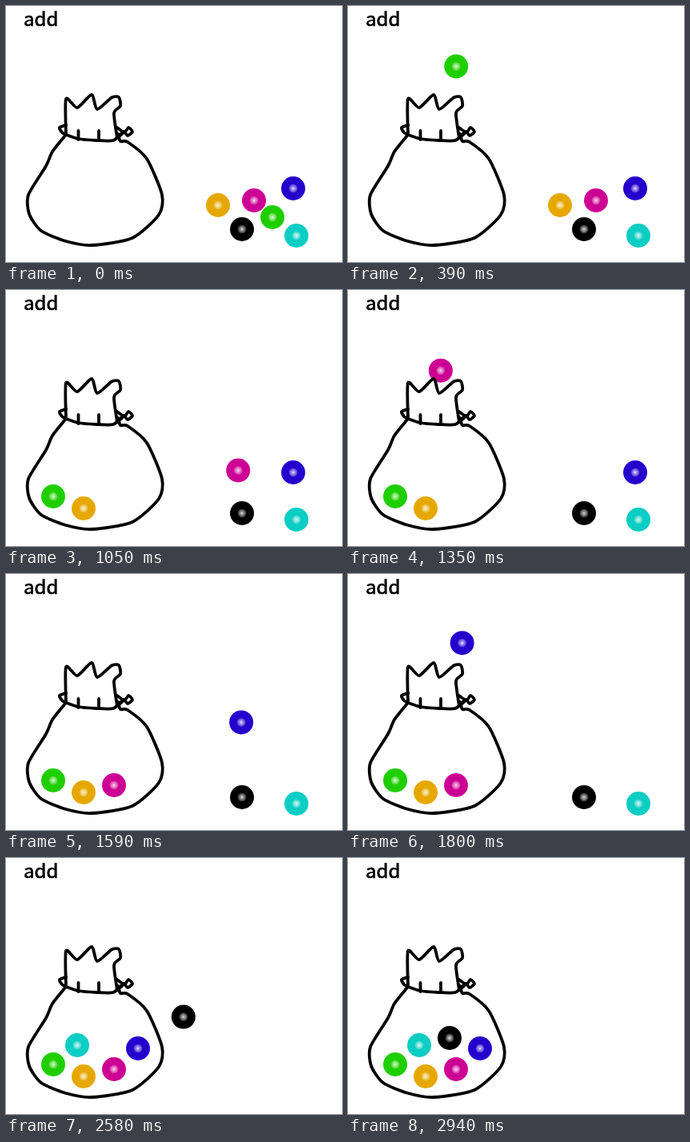
Write an HTML page with a canvas that moves like this. It is 420 by 320 pixels and loops after 3670 ms.

```html
<!DOCTYPE html>
<html lang="en">
<head>
<meta charset="utf-8">
<title>Add to the bag</title>
<style>
html, body { margin: 0; width: 100%; height: 100%; overflow: hidden; background: #fff; }
canvas { display: block; }
</style>
</head>
<body>
<canvas id="stage" width="420" height="320"></canvas>
<script>
const ctx = document.getElementById('stage').getContext('2d');
const LOOP = 3670, STEP = 30, LAST = 98;
const RADIUS = 15, SHINE = 5.5, FALL = 6;

// A ball leaves its rest place at step `go`, is above the bag at step `top`,
// and drops into its slot FALL steps later. `arch` > 1 bows the rise upward.
function ball(color, go, top, rest, peak, slot, arch = 1) {
  return { color, go, top, rest, peak, slot, arch };
}
const balls = [
  ball('#1fce00', 0, 14, [333, 264], [120, 61], [59, 258]),
  ball('#e6a800', 19, 28, [265, 249], [112, 70], [97, 273]),
  ball('#cd0094', 34, 44, [310, 243], [112, 68], [135, 264]),
  ball('#2500cd', 50, 61, [359, 228], [121, 72], [165, 238]),
  ball('#0acdc3', 67, 75, [363, 287], [112, 65], [89, 234], 1.66),
  ball('#000000', 82, 92, [295, 279], [112, 78], [127, 225])
];

const collar = [[75, 161], [75, 116], [89, 127], [107, 111], [114, 129],
  [132, 114.5], [141, 114], [143, 125], [135, 134], [139, 165]];
const rim = [[75, 161], [90, 166], [113, 168], [134, 168], [147, 158]];
const leftKnot = [[75, 149], [67, 152], [70, 158], [75, 161]];
const rightKnot = [[139, 152], [148, 158], [153, 152], [158, 157], [152, 162], [147, 157], [138, 165]];
const body = [[74, 162], [58, 182], [50, 200], [28, 236], [29, 260], [44, 281], [75, 294], [107, 299],
  [158, 290], [191, 261], [195, 236], [176, 191], [152, 170], [143, 169], [140, 160]];
const folds = [90.5, 116].map(x => [[x, 156], [x, 167]]);
const bag = [collar, rim, leftKnot, rightKnot, body, ...folds];

const clamp = k => Math.min(1, Math.max(0, k));
const mix = (a, b, k) => a + (b - a) * k;

function place(b, step) {
  if (step > b.top) {
    const k = clamp((step - b.top) / FALL);
    return [mix(b.peak[0], b.slot[0], k), mix(b.peak[1], b.slot[1], k)];
  }
  const k = clamp((step - b.go) / (b.top - b.go));
  const lift = 1 - (1 - k) ** b.arch;
  return [mix(b.rest[0], b.peak[0], k), mix(b.rest[1], b.peak[1], lift)];
}

function disc(x, y, r, fill) {
  ctx.fillStyle = fill;
  ctx.beginPath();
  ctx.arc(x, y, r, 0, Math.PI * 2);
  ctx.fill();
}

function drawBall(b, step) {
  const [x, y] = place(b, step);
  disc(x, y, RADIUS, b.color);
  const glow = ctx.createRadialGradient(x, y, 0, x, y, SHINE);
  glow.addColorStop(0, 'rgba(255,255,255,0.85)');
  glow.addColorStop(1, 'rgba(255,255,255,0.15)');
  disc(x, y, SHINE, glow);
}

// Smooth pen line through all points
function drawStroke(points, tension = 0.12) {
  const at = i => points[Math.min(points.length - 1, Math.max(0, i))];
  const handle = (i, side) => at(i).map((v, axis) => v + side * tension * (at(i + 1)[axis] - at(i - 1)[axis]));
  ctx.beginPath();
  ctx.moveTo(...points[0]);
  for (let i = 1; i < points.length; i++) {
    ctx.bezierCurveTo(...handle(i - 1, 1), ...handle(i, -1), ...points[i]);
  }
  ctx.stroke();
}

function drawLabel() {
  ctx.font = '24px "Noto Sans CJK SC", "Noto Sans CJK JP", "Noto Sans", sans-serif';
  ctx.fillStyle = '#000';
  ctx.lineWidth = 0.7;
  ctx.fillText('add', 22, 25);
  ctx.strokeText('add', 22, 25);
}

function draw(time) {
  const step = Math.min(LAST, Math.floor((time % LOOP) / STEP));
  ctx.fillStyle = '#fff';
  ctx.fillRect(0, 0, 420, 320);
  balls.forEach(b => drawBall(b, step));
  ctx.strokeStyle = '#000';
  ctx.lineCap = ctx.lineJoin = 'round';
  ctx.lineWidth = 3.8;
  bag.forEach(line => drawStroke(line));
  drawLabel();
}

let start = null;
function tick(now) {
  if (start === null) start = now;
  draw(Math.max(0, now - start));
  requestAnimationFrame(tick);
}
draw(0);
requestAnimationFrame(tick);
</script>
</body>
</html>
```
